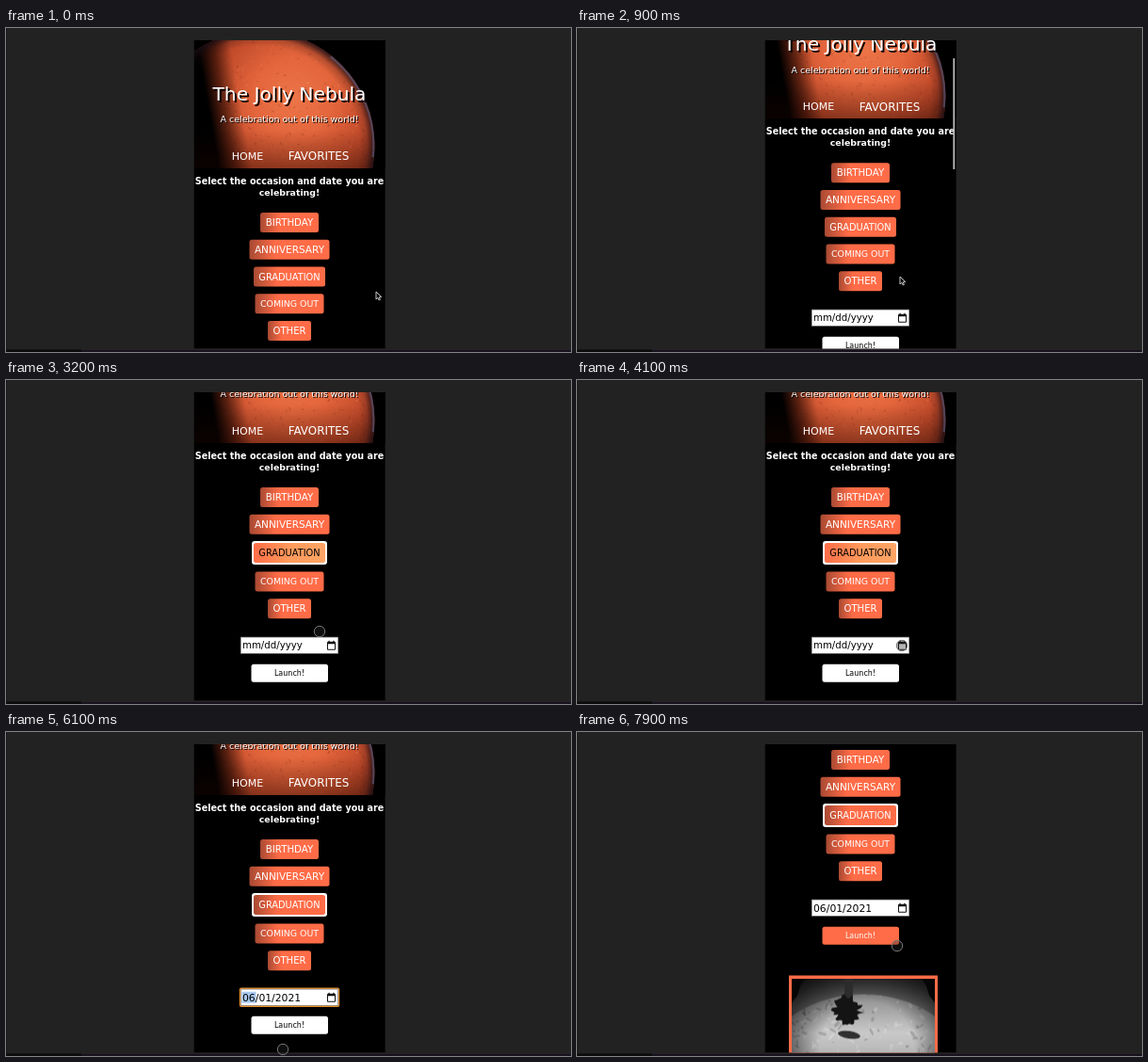
These frames come from a looping animation (600 by 344 pixels, 8 s). An HTML page with a canvas:

```html
<!DOCTYPE html>
<html lang="en">
<head>
<meta charset="utf-8">
<title>The Jolly Nebula</title>
<style>
  html, body { margin: 0; width: 100%; height: 100%; overflow: hidden; background: #222; }
  canvas { display: block; }
</style>
</head>
<body>
<canvas id="stage" width="600" height="344"></canvas>
<script>
const LOOP = 8000, STEP = 100;
const VIEW = { x: 199.5, y: 13, w: 203.3, h: 327.5 };
const MID = 301;
const WIDE = '"DejaVu Sans", sans-serif';
const SANS = '"Liberation Sans", sans-serif';
const CORAL = '#ff6c47';

// Moments at which the page reacts
const TAP_BUTTON = 2500, OPEN_PICKER = 4300, PICK_DAY = 5400, TAP_LAUNCH = 6700;
const DRAG = 95;

const BUTTONS = [
  ['BIRTHDAY', 62, 10.2, 206.5],
  ['ANNIVERSARY', 85, 10.5, 235.2],
  ['GRADUATION', 76, 9.8, 264],
  ['COMING OUT', 73, 9.4, 292.7],
  ['OTHER', 46, 10.1, 321.5]
];

// time, x, y of the pointer
const PATH = [
  [200, 393, 280], [900, 343, 264], [1200, 330, 232], [1700, 312, 182],
  [2600, 312, 182], [3200, 333, 267], [3600, 345, 282], [4300, 345, 282],
  [4900, 292.5, 341], [5400, 293, 341], [5500, 294, 337], [6100, 294, 337],
  [6600, 340, 322]
];

const c = document.getElementById('stage').getContext('2d');

const clamp = v => Math.max(0, Math.min(1, v));
const ramp = (t, a, b) => clamp((t - a) / (b - a));
const ease = (t, a, b) => { const k = ramp(t, a, b); return k * k * (3 - 2 * k); };

function random(seed) {
  return () => (seed = (seed * 16807) % 2147483647) / 2147483647;
}

function layer(w, h, paint) {
  const el = document.createElement('canvas');
  el.width = w;
  el.height = h;
  paint(el.getContext('2d'), w, h);
  return el;
}

function stops(gradient, colors) {
  colors.forEach((col, i) => gradient.addColorStop(i / (colors.length - 1), col));
  return gradient;
}

const fade = (g, x0, y0, x1, y1, ...colors) =>
  stops(g.createLinearGradient(x0, y0, x1, y1), colors);
const glow = (g, x, y, r0, r1, ...colors) =>
  stops(g.createRadialGradient(x, y, r0, x, y, r1), colors);

function rect(x, y, w, h, fill, r = 0) {
  c.fillStyle = fill;
  c.beginPath();
  c.roundRect(x, y, w, h, r);
  c.fill();
}

// y is the middle of the capitals
function text(str, x, y, size, color, { font = WIDE, weight = 400, align = 'center' } = {}) {
  c.font = `${weight} ${size}px ${font}`;
  c.textAlign = align;
  c.fillStyle = color;
  c.fillText(str, x, y + size * 0.36);
}

function blots(g, count, seed, w, h, size, tones) {
  const rnd = random(seed);
  for (let i = 0; i < count; i++) {
    g.fillStyle = tones[i % tones.length];
    g.beginPath();
    g.ellipse(rnd() * w, rnd() * h, size * (0.3 + rnd()), size * (0.15 + rnd() * 0.4), rnd() * 3, 0, 7);
    g.fill();
  }
}

const planet = layer(203, 136, (g, w, h) => {
  const X = 69.5, Y = 112, R = 122;
  g.fillRect(0, 0, w, h);
  g.save();
  g.beginPath();
  g.arc(X, Y, R, 0, 7);
  g.clip();
  g.fillStyle = glow(g, 105, 62, 0, 125, '#ec7548', '#e4663c', '#c04a2a', '#7d2a18');
  g.fillRect(0, 0, w, h);
  blots(g, 420, 5, w, h, 1.8, ['rgba(90,25,15,.16)', 'rgba(255,165,110,.13)']);
  g.fillStyle = fade(g, 4, 10, 38, 4, '#000', 'rgba(30,6,0,.6)', 'rgba(40,10,0,0)');
  g.fillRect(0, 0, w, h);
  g.fillStyle = fade(g, 0, 95, 0, h, 'rgba(30,6,0,0)', 'rgba(30,6,0,.35)');
  g.fillRect(0, 0, w, h);
  g.fillStyle = glow(g, X, Y, R - 16, R, 'rgba(30,10,10,0)', 'rgba(30,12,15,.2)', 'rgba(20,12,22,.85)');
  g.fillRect(0, 0, w, h);
  g.strokeStyle = 'rgba(110,110,150,.5)';
  g.lineWidth = 2.5;
  g.beginPath();
  g.arc(X, Y, R - 1, -0.9, 0.1);
  g.stroke();
  g.restore();
});

const photo = layer(152, 152, (g, w, h) => {
  g.fillStyle = fade(g, 0, 0, 0, 32, '#3c3c3c', '#777');
  g.fillRect(0, 0, w, h);
  g.save();
  g.beginPath();
  g.ellipse(76, 120, 120, 103, 0, 0, 7);
  g.clip();
  g.fillStyle = fade(g, 0, 16, 0, 100, '#8c8c8c', '#c9c9c9', '#a5a5a5');
  g.fillRect(0, 0, w, h);
  blots(g, 260, 23, w, h, 3.5, ['rgba(50,50,50,.22)', 'rgba(255,255,255,.2)']);
  g.restore();
  g.fillStyle = glow(g, 80, 75, 50, 112, 'rgba(0,0,0,0)', 'rgba(0,0,0,.95)');
  g.fillRect(0, 0, w, h);
  // Robot arm with its jagged head and shadow
  g.fillStyle = '#2c2c2c';
  g.fillRect(56, 0, 9, 24);
  g.fillStyle = '#141414';
  const rnd = random(7);
  g.beginPath();
  for (let i = 0; i < 40; i++) {
    const a = i * Math.PI / 20, r = 10 + rnd() * 8;
    g.lineTo(59 + Math.cos(a) * r, 34 + Math.sin(a) * r);
  }
  g.fill();
  g.fillStyle = '#303030';
  g.beginPath();
  g.ellipse(61, 60, 12, 4, 0.15, 0, 7);
  g.fill();
  // Rounded lens corners
  g.fillStyle = '#050505';
  for (const [x, s] of [[0, 1], [w, -1]]) {
    g.beginPath();
    g.moveTo(x, 0);
    g.lineTo(x + s * 14, 0);
    g.lineTo(x + s * 9, 8);
    g.lineTo(x + s * 6, 18);
    g.lineTo(x, 26);
    g.fill();
  }
});

function header() {
  c.drawImage(planet, 200, 13);
  const line = (str, x, y, size, d) => {
    text(str, x + d, y + d, size, '#000');
    text(str, x, y, size, '#fff');
  };
  line('The Jolly Nebula', MID, 70, 20.2, 2);
  line('A celebration out of this world!', MID, 97, 9.5, 1);
  text('HOME', 256.5, 136, 11, '#fff');
  text('FAVORITES', 332, 136, 11.9, '#fff');
  text('Select the occasion and date you are', MID, 162.5, 9.6, '#fff', { weight: 700 });
  text('celebrating!', MID, 174.5, 9.4, '#fff', { weight: 700 });
}

function buttons(t) {
  const tapped = t >= TAP_BUTTON;
  const hover = tapped && t < OPEN_PICKER;
  BUTTONS.forEach(([label, w, size, y], i) => {
    const active = tapped && i === 2;
    if (tapped && i >= 2) y += i === 2 ? 1.6 : 3.2;
    const x = MID - w / 2;
    if (active) rect(x - 2, y - 12.5, w + 4, 25, '#fff', 3);
    const tones = active && hover ? [CORAL, '#ff9a5c', '#ffa566'] : ['#a84a33', CORAL, CORAL, CORAL];
    rect(x, y - 10.5, w, 21, fade(c, x, 0, x + w, 0, ...tones), 2.5);
    text(label, MID, y, size, active && hover ? '#000' : '#fff');
  });
}

function calendarIcon(x, y) {
  rect(x, y + 1, 9, 9, '#111', 1);
  rect(x + 1, y + 3.6, 7, 5.4, '#fff');
  rect(x + 1.5, y, 1.2, 2, '#111');
  rect(x + 6.3, y, 1.2, 2, '#111');
}

function form(t) {
  const y = 360.5 + (t >= TAP_BUTTON ? 3.2 : 0);
  const picked = t >= PICK_DAY;
  const focus = t >= OPEN_PICKER && t < TAP_LAUNCH;
  if (focus && picked) rect(247.8, y - 10.2, 106.4, 20.4, '#e8912d', 2);
  rect(249, y - 9, 104, 18, '#888');
  rect(249.8, y - 8.2, 102.4, 16.4, '#fff');
  if (focus) rect(250.5, y - 6, picked ? 15 : 18, 12, '#a9c8ee');
  text(picked ? '06/01/2021' : 'mm/dd/yyyy', 251, y, picked ? 10.8 : 10.2, '#000', { align: 'left' });
  calendarIcon(341, y - 5);

  const sent = t >= TAP_LAUNCH;
  rect(260.5, y + 20, 81.5, 19, sent ? CORAL : '#fff', 2.5);
  text('Launch!', MID, y + 29.7, 8, sent ? '#fff' : '#000');
}

function picture() {
  rect(225, 435.5, 158, 158, CORAL);
  c.drawImage(photo, 228, 438.5);
}

function arrow(x, y, dir, color) {
  c.strokeStyle = color;
  c.lineWidth = 0.9;
  c.beginPath();
  c.moveTo(x, y - 4.5 * dir);
  c.lineTo(x, y + 4.5 * dir);
  c.moveTo(x - 4, y - 0.5 * dir);
  c.lineTo(x, y - 4.5 * dir);
  c.lineTo(x + 4, y - 0.5 * dir);
  c.stroke();
}

function picker() {
  rect(243.5, 318, 30, 13.5, '#3a3a3a', 1);
  rect(244.3, 318.8, 30, 12, '#1d1d1d', 1);
  rect(249, 291, 118, 53, '#fdfdfd');
  text('June 2021', 254, 303, 6.8, '#111', { font: SANS, weight: 700, align: 'left' });
  c.beginPath();
  c.moveTo(288.5, 302);
  c.lineTo(292.5, 302);
  c.lineTo(290.5, 304.5);
  c.fill();
  arrow(336, 303.5, 1, '#444');
  arrow(353, 303.5, -1, '#b5b5b5');
  rect(315.5, 332, 15, 12, '#e8912d');
  rect(316.5, 333, 13, 11, '#1a66e0');
  const days = [30, 31, 1, 2, 3, 4, 5];
  [...'SMTWTFS'].forEach((d, i) => {
    const x = 262 + i * 15.2;
    const tone = i === 4 ? '#fff' : i === 2 || i === 3 ? '#111' : i < 2 ? '#777' : '#bbb';
    text(d, x, 323, 6.8, '#333', { font: SANS });
    text(days[i], x, 339, 7, tone, { font: SANS, weight: i === 4 ? 700 : 400 });
  });
}

function position(t) {
  const i = PATH.findIndex(p => p[0] > t);
  if (i === 0) return PATH[0].slice(1);
  if (i < 0) return PATH[PATH.length - 1].slice(1);
  const [a, x0, y0] = PATH[i - 1], [b, x1, y1] = PATH[i];
  const k = ramp(t, a, b);
  return [x0 + (x1 - x0) * k, y0 + (y1 - y0) * k];
}

function pointer(t, drag) {
  const [x, y] = position(t);
  const touch = t >= TAP_BUTTON && (t < OPEN_PICKER || t >= PICK_DAY);
  c.beginPath();
  if (touch) {
    c.arc(x, y - drag, 5.7, 0, 7);
    c.fillStyle = 'rgba(40,40,40,.35)';
    c.strokeStyle = '#777';
    c.lineWidth = 1;
    c.fill();
  } else {
    const tip = [0, 0, 0, 8, 1.8, 6.3, 3.1, 9, 4.4, 8.4, 3.2, 5.8, 5.7, 5.7];
    for (let i = 0; i < tip.length; i += 2) c.lineTo(x + tip[i], y + tip[i + 1]);
    c.closePath();
    c.fillStyle = '#000';
    c.strokeStyle = '#ddd';
    c.lineWidth = 0.9;
    c.fill();
  }
  c.stroke();
}

function scrollbar(t, scroll) {
  const shown = t < 4000
    ? ramp(t, 400, 500) - ramp(t, 1500, 1800)
    : ramp(t, 6700, 6800) - ramp(t, 7300, 7500);
  c.globalAlpha = shown;
  rect(399.4, VIEW.y + scroll * 0.361, 1.8, 118, '#bcbcbc', 0.9);
  c.globalAlpha = 1;
}

function backdrop() {
  rect(0, 0, 600, 344, '#222');
  rect(0, 0, 1, 344, '#171717');
  rect(0, 342, 600, 2, '#18121f');
  rect(0, 341.5, 80, 2.5, '#0b0b0b');
}

function draw(t) {
  const drag = DRAG * ease(t, 6800, 7400);
  const scroll = 82 * ease(t, 500, 1170) + drag;

  backdrop();
  c.save();
  c.beginPath();
  c.rect(VIEW.x, VIEW.y, VIEW.w, VIEW.h);
  c.clip();
  rect(VIEW.x, VIEW.y, VIEW.w, VIEW.h, '#000');
  c.translate(0, -scroll);
  header();
  buttons(t);
  form(t);
  picture();
  c.translate(0, scroll);
  scrollbar(t, scroll);
  c.restore();

  if (t >= OPEN_PICKER && t < PICK_DAY) picker();
  pointer(t, drag);
}

let start;
function tick(now) {
  start ??= now;
  draw(Math.floor((now - start) % LOOP / STEP) * STEP);
  requestAnimationFrame(tick);
}
requestAnimationFrame(tick);
</script>
</body>
</html>
```
